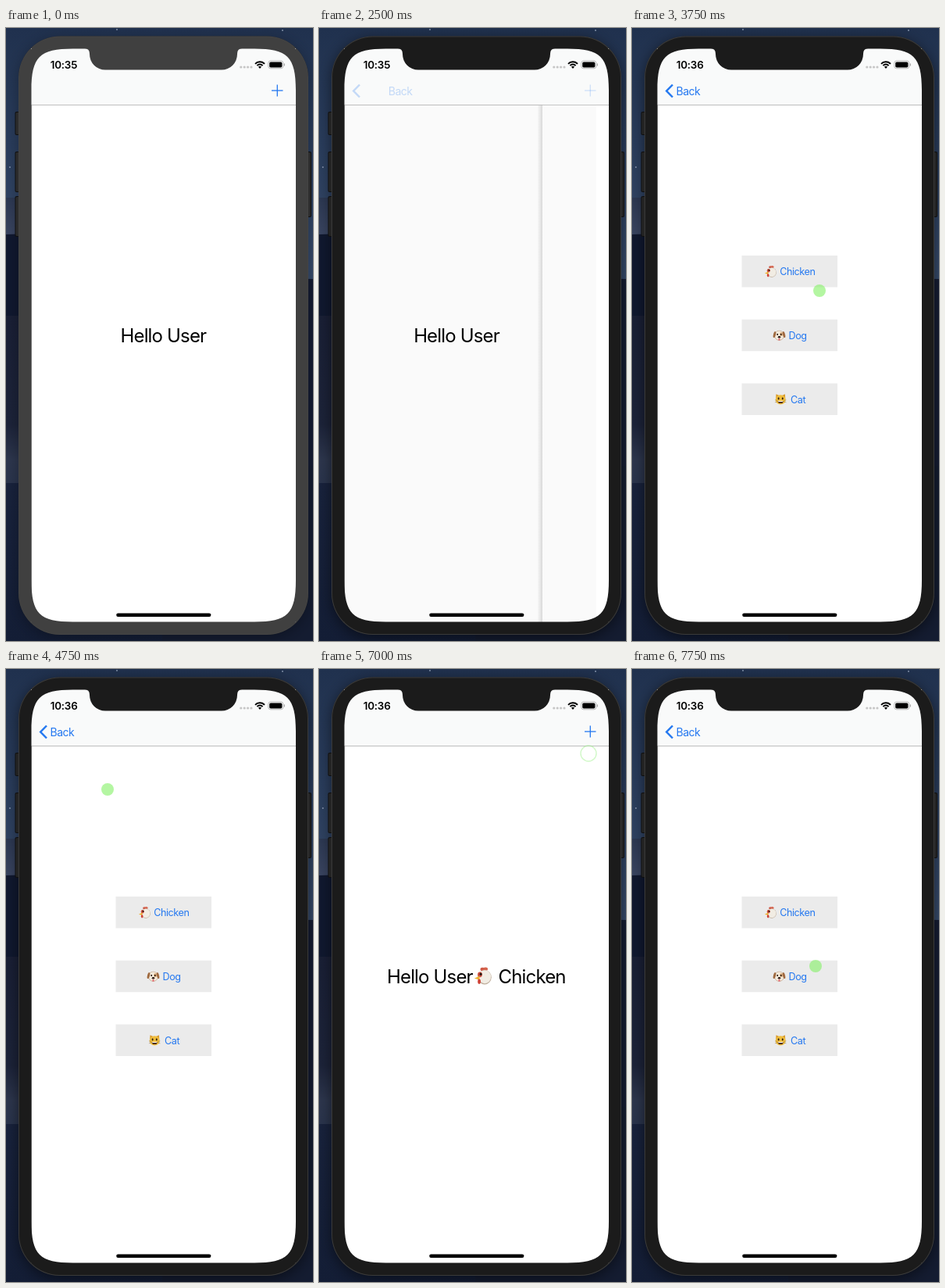
Write an HTML page with a canvas that moves like this. It is 393 by 784 pixels and loops after 8 s.

```html
<!DOCTYPE html>
<html lang="en">
<head>
<meta charset="utf-8">
<title>Phone demo</title>
<style>
html, body { margin: 0; width: 100%; height: 100%; overflow: hidden; background: #131c36; }
canvas { display: block; width: 393px; height: 784px; }
</style>
</head>
<body>
<canvas id="stage"></canvas>
<script>
const W = 393, H = 784, STEP = 250, LOOP = 8000;
const BLUE = '#2478f0';
const SCREEN = { x: 32.5, y: 26.5, w: 338.5, h: 733 };
const NAV_BOTTOM = 98.5;

const canvas = document.getElementById('stage');
const ratio = window.devicePixelRatio || 1;
canvas.width = W * ratio;
canvas.height = H * ratio;
const ctx = canvas.getContext('2d');
ctx.scale(ratio, ratio);

// Pointer stretches: start step, end step, from, to. Clicks leave a ring.
const moves = [
  [3, 4, 240, 305, 232, 281],
  [7, 8, 272, 205, 338, 115],
  [12, 14, 324, 155, 240, 336],
  [15, 16, 240, 336, 226, 318],
  [18, 19, 196, 268, 130, 154],
  [20, 20, 55, 71, 55, 71],
  [24, 27, 120, 100, 338, 110],
  [31, 31, 235, 380, 235, 380]
];
const clicks = { 5: [232, 281], 9: [344, 108], 17: [226, 318], 21: [56, 76], 28: [345, 108] };

// Share of the list page that has slid in.
function pageProgress(step) {
  const slide = [0, 0.25, 0.964, 1];
  const since = start => slide[Math.max(0, Math.min(3, step - start))];
  return since(9) - since(21) + since(28);
}

function rect(x, y, w, h, color) {
  ctx.fillStyle = color;
  ctx.fillRect(x, y, w, h);
}

function roundRect(x, y, w, h, r, color) {
  ctx.beginPath();
  ctx.roundRect(x, y, w, h, r);
  ctx.fillStyle = color;
  ctx.fill();
}

function ellipse(x, y, rx, ry, color, angle = 0) {
  ctx.beginPath();
  ctx.ellipse(x, y, rx, ry, angle, 0, Math.PI * 2);
  ctx.fillStyle = color;
  ctx.fill();
}

function polygon(points, color) {
  ctx.beginPath();
  points.forEach(([x, y]) => ctx.lineTo(x, y));
  ctx.closePath();
  ctx.fillStyle = color;
  ctx.fill();
}

function strokeLine(points, width, color) {
  ctx.beginPath();
  points.forEach(([x, y]) => ctx.lineTo(x, y));
  ctx.lineWidth = width;
  ctx.strokeStyle = color;
  ctx.stroke();
}

function gradient(x0, y0, x1, y1, stops) {
  const g = ctx.createLinearGradient(x0, y0, x1, y1);
  stops.forEach(([at, color]) => g.addColorStop(at, color));
  return g;
}

function text(str, x, y, size, color, weight = 400) {
  ctx.font = `${weight} ${size}px Inter, Roboto, sans-serif`;
  ctx.letterSpacing = weight > 400 ? '-0.2px' : `${-0.035 * size}px`;
  ctx.fillStyle = color;
  ctx.fillText(str, x, y);
}

function at(x, y, scale, draw) {
  ctx.save();
  ctx.translate(x, y);
  ctx.scale(scale, scale);
  draw();
  ctx.restore();
}

function faded(alpha, draw) {
  ctx.save();
  ctx.globalAlpha = Math.max(0, Math.min(1, alpha));
  draw();
  ctx.restore();
}

function chicken() {
  ellipse(-0.5, -7.5, 2.6, 2, '#cf5a48');
  ellipse(2.8, -7.8, 2.6, 2, '#d5654f');
  ellipse(1.8, 1.6, 7.8, 8.2, '#bfae9c');
  ellipse(2, 1.2, 7, 7.6, '#f1ece3');
  ellipse(-3.6, -1.5, 2.6, 3, '#cf5040');
  polygon([[-4, 0], [-10, 3], [-4, 4.5]], '#eeb02f');
  ellipse(-4.4, 6.4, 1.7, 2.8, '#cf4034');
  ellipse(-2.6, -2, 1.3, 1.5, '#26170f');
}

function dog() {
  ellipse(0, 0, 8.2, 8.6, '#b9997a');
  ellipse(0, 0, 7.5, 8, '#f5ecdd');
  ellipse(3.4, -2.2, 2.6, 3.4, '#dcae7c');
  ellipse(-7.9, -1.5, 2, 5.4, '#a06a40', 0.25);
  ellipse(7.9, -1.5, 2, 5.4, '#a06a40', -0.25);
  ellipse(-3, -1.8, 1.2, 1.6, '#2a1a14');
  ellipse(3, -1.8, 1.2, 1.6, '#2a1a14');
  ellipse(0, 6.5, 1.5, 2, '#e4707a');
  ellipse(0, 2.6, 2.3, 1.6, '#2a1a14');
}

function cat() {
  polygon([[-8, -1], [-7.5, -9], [-1, -6]], '#d89a2c');
  polygon([[8, -1], [7.5, -9], [1, -6]], '#d89a2c');
  ellipse(0, 0.5, 8.5, 8, '#efbd3d');
  ellipse(-3.4, -1.5, 1.3, 2, '#35220f');
  ellipse(3.4, -1.5, 1.3, 2, '#35220f');
  polygon([[-5, 2.5], [5, 2.5], [3, 6.5], [-3, 6.5]], '#50301d');
  rect(-4, 2.5, 8, 1.4, '#fff');
  for (const s of [-1, 1]) {
    strokeLine([[s * 6, 2], [s * 9.5, 1]], 0.6, '#82643a');
    strokeLine([[s * 6, 4], [s * 9.5, 5]], 0.6, '#82643a');
  }
}

function drawWallpaper() {
  rect(0, 0, W, H, gradient(0, 0, 0, 320, [[0, '#20314e'], [0.45, '#293c5b'], [1, '#374b6b']]));
  rect(0, 217, 200, 50, gradient(0, 217, 0, 267, [[0, '#2c3852'], [1, '#3a4561']]));
  polygon([[0, 264], [200, 258], [200, 784], [0, 784]], '#10182f');
  rect(0, 368, 200, 214, gradient(0, 368, 0, 582,
    [[0, '#191f35'], [0.65, '#1c2339'], [0.86, '#2d364d'], [1, '#2a344c']]));
  rect(0, 582, 200, 202, gradient(0, 582, 0, 784, [[0, '#18223c'], [1, '#131d35']]));
  polygon([[200, 318], [W, 321], [W, H], [200, H]], '#151c33');
  rect(200, 560, 193, 224, '#141c31');
  for (const [x, y] of [[5, 178], [142, 2], [354, 3]]) ellipse(x, y, 0.9, 0.9, '#8d9bb4');
}

function drawBody(active) {
  ctx.save();
  ctx.shadowColor = active ? 'rgba(0,0,0,0.5)' : 'rgba(0,0,0,0.3)';
  ctx.shadowBlur = 18 * ratio;
  ctx.shadowOffsetY = 4 * ratio;
  roundRect(16, 10.5, 371, 765.5, 53, '#222');
  ctx.restore();
  const side = active ? '#242424' : '#2c2c2c';
  const keys = [[11.5, 107, 30], [11.5, 158, 52], [11.5, 215, 52], [383, 158, 84]];
  for (const [x, y, h] of keys) {
    roundRect(x, y, 8, h, 2, '#111');
    roundRect(x + 1, y + 1, 6, h - 2, 1.5, side);
  }
  roundRect(16, 10.5, 371, 765.5, 53, active ? '#3a3a3a' : '#444');
}

// Screen outline with continuous corners: reach is where the curve begins.
function traceScreen() {
  const { x, y, w, h } = SCREEN;
  const reach = 53, near = reach * 0.2;
  const corners = [[x, y, 1, 1], [x + w, y, -1, 1], [x + w, y + h, -1, -1], [x, y + h, 1, -1]];
  corners.forEach(([cx, cy, sx, sy], i) => {
    const a = [cx, cy + sy * reach], b = [cx, cy + sy * near];
    const c = [cx + sx * near, cy], d = [cx + sx * reach, cy];
    const [p, q, r, s] = i % 2 ? [d, c, b, a] : [a, b, c, d];
    if (i) ctx.lineTo(...p); else ctx.moveTo(...p);
    ctx.bezierCurveTo(...q, ...r, ...s);
  });
  ctx.closePath();
}

function drawBezel(color) {
  ctx.fillStyle = color;
  ctx.beginPath();
  ctx.roundRect(17, 11.5, 369, 763.5, 52);
  traceScreen();
  ctx.fill('evenodd');

  ctx.beginPath();
  ctx.moveTo(101, 26);
  ctx.quadraticCurveTo(107, 26.5, 107, 33);
  ctx.arcTo(107, 53.5, 127, 53.5, 20);
  ctx.arcTo(296, 53.5, 296, 33, 20);
  ctx.lineTo(296, 33);
  ctx.quadraticCurveTo(296, 26.5, 302, 26);
  ctx.closePath();
  ctx.fill();
}

function drawHome(dx, chosen) {
  rect(SCREEN.x, NAV_BOTTOM, SCREEN.w, 662, '#fff');
  text('Hello User', (chosen ? 87 : 146.5) + dx, 402, 24, '#000');
  if (!chosen) return;
  at(210 + dx, 392.5, 1.12, chicken);
  text('Chicken', 229.5 + dx, 402, 24, '#000');
}

function drawList(dx) {
  const left = SCREEN.x + dx;
  rect(left, NAV_BOTTOM, SCREEN.w, 662, '#fff');
  if (dx > 100) rect(left, NAV_BOTTOM, 355 - left, 662, '#fafafa');
  const rows = [['Chicken', 189.2, 177.5, chicken], ['Dog', 200.5, 188.5, dog], ['Cat', 203, 190.2, cat]];
  rows.forEach(([label, x, iconX, icon], i) => {
    const y = 291 + i * 81.75;
    rect(140.5 + dx, y, 122.5, 40.5, '#ebebeb');
    at(iconX + dx, y + 20.5, 0.76, icon);
    text(label, x + dx, y + 25, 12.6, BLUE);
  });
}

function drawPages(p, chosen) {
  if (p < 1) {
    drawHome(-101.5 * p, chosen);
    rect(SCREEN.x, NAV_BOTTOM, SCREEN.w, 662, `rgba(0,0,0,${0.08 * p})`);
  }
  if (p > 0) {
    const dx = SCREEN.w * (1 - p);
    const edge = SCREEN.x + dx;
    if (p < 1) {
      rect(edge - 7, NAV_BOTTOM, 7, 662,
        gradient(edge - 7, 0, edge, 0, [[0, 'rgba(0,0,0,0)'], [1, 'rgba(0,0,0,0.14)']]));
    }
    drawList(dx);
  }
}

function drawNavBar(p) {
  rect(SCREEN.x - 1, SCREEN.y - 1, SCREEN.w + 1, 73, '#f9fafa');
  rect(SCREEN.x, 98, SCREEN.w, 0.8, '#bcbcbc');
  faded(1 - 3.2 * p, () => {
    strokeLine([[340, 80], [354.5, 80]], 1.3, BLUE);
    strokeLine([[347.3, 72.5], [347.3, 87.5]], 1.3, BLUE);
  });
  faded(p, () => {
    strokeLine([[52, 72.5], [44.2, 80.5], [52, 88.5]], 2.5, BLUE);
    text('Back', 56.5 + 43 * (1 - p), 85.5, 14, BLUE);
  });
}

function drawStatus(clock) {
  text(clock, 56.7, 51.5, 13.4, '#000', 600);
  for (let i = 0; i < 4; i++) ellipse(300.8 + i * 4.4, 50, 1.6, 1.6, '#c6c6c6');
  ctx.lineWidth = 2;
  ctx.strokeStyle = '#000';
  for (const r of [4.9, 8.2]) {
    ctx.beginPath();
    ctx.arc(325, 51.5, r, -Math.PI * 0.76, -Math.PI * 0.24);
    ctx.stroke();
  }
  polygon([[322.9, 49.6], [325, 48.7], [327.1, 49.6], [325, 52]], '#000');
  ctx.beginPath();
  ctx.roundRect(335.8, 42, 19, 9.8, 2.8);
  ctx.lineWidth = 0.8;
  ctx.strokeStyle = '#aaa';
  ctx.stroke();
  roundRect(337.2, 43.4, 16.2, 7, 1.6, '#000');
  roundRect(355.8, 45.3, 1.2, 3.2, 0.6, '#aaa');
}

function drawPointer(step) {
  if (clicks[step]) {
    const [x, y] = clicks[step];
    ctx.beginPath();
    ctx.arc(x, y, 10, 0, Math.PI * 2);
    ctx.lineWidth = 1.4;
    ctx.strokeStyle = 'rgba(150,240,130,0.45)';
    ctx.stroke();
    return;
  }
  const move = moves.find(([from, to]) => step >= from && step <= to);
  if (!move) return;
  const [from, to, x0, y0, x1, y1] = move;
  const k = (step - from) / (to - from || 1);
  ellipse(x0 + (x1 - x0) * k, y0 + (y1 - y0) * k, 8, 8, 'rgba(130,240,100,0.6)');
}

function draw(step) {
  const p = pageProgress(step);
  const active = step >= 4;
  drawWallpaper();
  drawBody(active);
  ctx.save();
  ctx.beginPath();
  ctx.rect(32, 26, 339, 734);
  ctx.clip();
  drawPages(p, step >= 17);
  drawNavBar(p);
  drawStatus(step < 14 ? '10:35' : '10:36');
  roundRect(141.2, 748.5, 121.2, 4.5, 2.25, '#000');
  ctx.restore();
  drawBezel(active ? '#1b1b1b' : '#404040');
  drawPointer(step);
}

function tick() {
  draw(Math.floor((performance.now() % LOOP) / STEP));
  requestAnimationFrame(tick);
}
tick();
</script>
</body>
</html>
```
